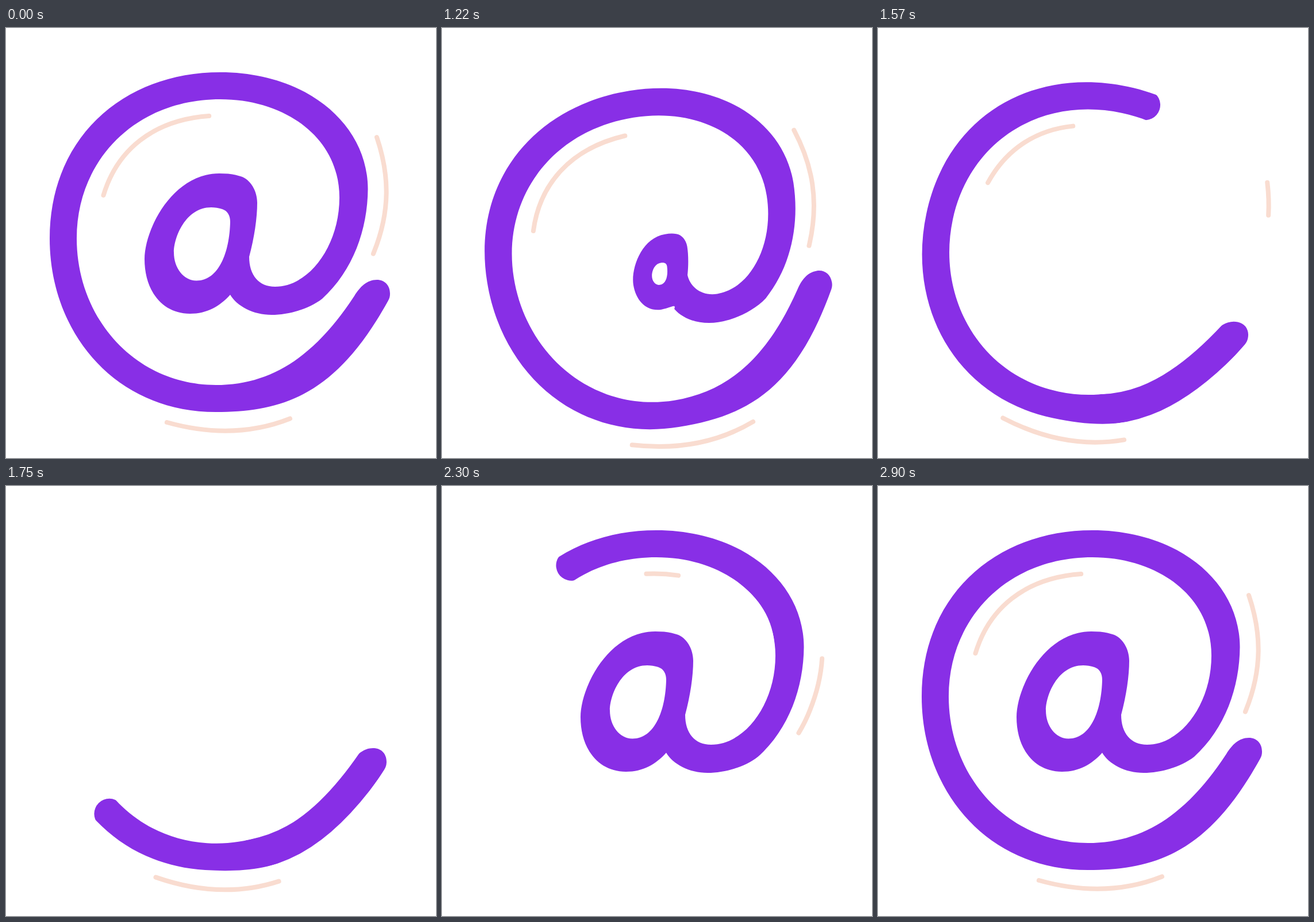
Animation of 748x748 px, one loop 3 s. Source, as an HTML page:

```html
<!DOCTYPE html>
<html lang="en">
<head>
<meta charset="utf-8">
<title>At sign</title>
<style>
  html, body { margin: 0; width: 100%; height: 100%; overflow: hidden; background: #fff; }
  svg { display: block; width: 100%; height: 100%; }
</style>
</head>
<body>
<svg viewBox="0 0 748 748">
  <defs>
    <mask id="reveal" maskUnits="userSpaceOnUse" x="-50" y="-50" width="850" height="850">
      <g fill="none" stroke="#fff" stroke-linecap="round" stroke-linejoin="round">
        <path id="letter" stroke-width="72" d="M408 285C380 275 350 278 330 287C290 310 266 355 266 395C266 440 290 470 325 468C370 468 395 425 412 300C408 370 395 410 410 440L440 468"/>
        <path id="ringIn" class="ring" stroke-width="53"/>
        <path id="ringOut" class="ring" stroke-width="53"/>
      </g>
    </mask>
  </defs>
  <g id="stage">
    <path id="sign" fill="#882fe6" fill-rule="evenodd"/>
    <g fill="none" stroke="#f9dcd0" stroke-width="8" stroke-linecap="round">
      <path id="right" d="M612 443Q630 416 640 390C669 318 667 255 645 190"/>
      <path id="top" d="M420 157Q385 151 353 153C255 160 193 213 169.5 291"/>
      <path id="bottom" d="M222 664Q250 678 280 686C355 707 427 706 494 679.5"/>
    </g>
  </g>
</svg>
<script>
const LOOP = 3000;
const $ = id => document.getElementById(id);
const clamp = x => Math.min(1, Math.max(0, x));
const smooth = x => { x = clamp(x); return x * x * (3 - 2 * x); };
const ease = (t, from, to) => smooth((t - from) / (to - from));

// Eased value through [time, value] keys.
function track(t, keys) {
  let value = keys[0][1];
  for (let i = 1; i < keys.length; i++)
    value += (keys[i][1] - keys[i - 1][1]) * ease(t, keys[i - 1][0], keys[i][0]);
  return value;
}

const RING_LINE = "M410 440C425 465 440 475 465 475C540 475 605 390 605 285C605 175 500 100 373 100" +
  "C210 100 100 215 100 366C100 520 210 645 365 645C480 645 560 600 643 461";
document.querySelectorAll(".ring").forEach(p => p.setAttribute("d", RING_LINE));

const TAIL = "M606 466C616 450 628 438 645 438C659 438 668 448 668 462C668 467 667 470 665 474" +
  "C575 637 484 668 365 668C190 668 76 530 76 366C76 190 205 77 373 77C520 77 629 165 629.5 280" +
  "C629 350 604 422 550 471C525 490 490 499 462 499C430 499 402 484 390 464";
const BOWL = "C372 484 350 497 320 497C270 497 241 455 241 402C241 350 290 253 371 253" +
  "C384 253 396 254 408 258C425 263 437 283 437 304C437 330 432 365 423 398";
const RING_INSIDE = "C423 430 440 450 468 450C528 450 580 378 580 295C580 190 485 124 373 124" +
  "C225 124 123 230 123 366C123 505 225 621 365 621C460 621 536 573 606 466Z";
const HOLE = "M390 337C389 390 370 440 331 439.5C309 439 292 418 292 390C292 365 312 312 357 312" +
  "C363 312 370 313 376 315C386 318 390 327 390 337Z";

const scalePath = (d, s, cx, cy) => d.replace(/([\d.]+) ([\d.]+)/g, (_, x, y) =>
  (cx + (x - cx) * s).toFixed(2) + " " + (cy + (y - cy) * s).toFixed(2));

function trim(id, from, to) {
  const style = $(id).style;
  style.visibility = to - from > 0.1 ? "visible" : "hidden";
  style.strokeDasharray = Math.max(0.1, to - from) + " 9999";
  style.strokeDashoffset = -from;
}

const length = {};
for (const id of ["letter", "ringIn", "right", "top", "bottom"]) length[id] = $(id).getTotalLength();

// front / back: windows for the two ends arriving; out: window for leaving; lead: run-up length
const accents = [
  { id: "right", lead: 57, out: [1440, 1640], front: [2100, 2465], back: [2140, 2610] },
  { id: "top", lead: 67, out: [1500, 1720], front: [2200, 2545], back: [2190, 2680] },
  { id: "bottom", lead: 62, out: [1760, 1960], front: [2430, 2780], back: [2430, 2900] }
];

function drawAccent({ id, lead, out, front, back }, t) {
  const full = length[id];
  if (t < out[1]) trim(id, lead + (full - lead) * ease(t, ...out), full);
  else trim(id, lead * ease(t, ...back), full * ease(t, ...front));
}

function drawSign(t) {
  const erasing = t < 1950;
  const shrink = erasing ? Math.min(2, Math.pow(Math.max(0, t - 1000) / 220, 1.9)) : 0;
  $("sign").setAttribute("d", TAIL + scalePath(BOWL, 1 - 0.47 * shrink, 421, 422) + RING_INSIDE +
    scalePath(HOLE, Math.max(0, 1 - 0.7 * shrink), 389, 410));

  if (t < 1320 || t > 2830) return $("sign").removeAttribute("mask");
  $("sign").setAttribute("mask", "url(#reveal)");
  const ring = length.ringIn;
  const drawn = (length.letter + ring) * smooth(Math.pow(clamp((t - 1950) / 880), 0.63));
  trim("letter", 0, Math.min(drawn, length.letter));
  trim("ringIn", 0, Math.max(0, drawn - length.letter));
  trim("ringOut", ring * ease(t, 1300, 2000), ring);
}

function render(t) {
  const angle = track(t, [[1000, 0], [1167, -10.3], [1560, 12], [1860, 0]]);
  const drop = track(t, [[1000, 0], [1333, 38.5], [1800, 0]]);
  $("stage").setAttribute("transform", `translate(0 ${drop}) rotate(${angle} 374 374)`);
  drawSign(t);
  accents.forEach(a => drawAccent(a, t));
}

const start = performance.now();
function tick() {
  render((performance.now() - start) % LOOP);
  requestAnimationFrame(tick);
}
tick();
</script>
</body>
</html>
```
